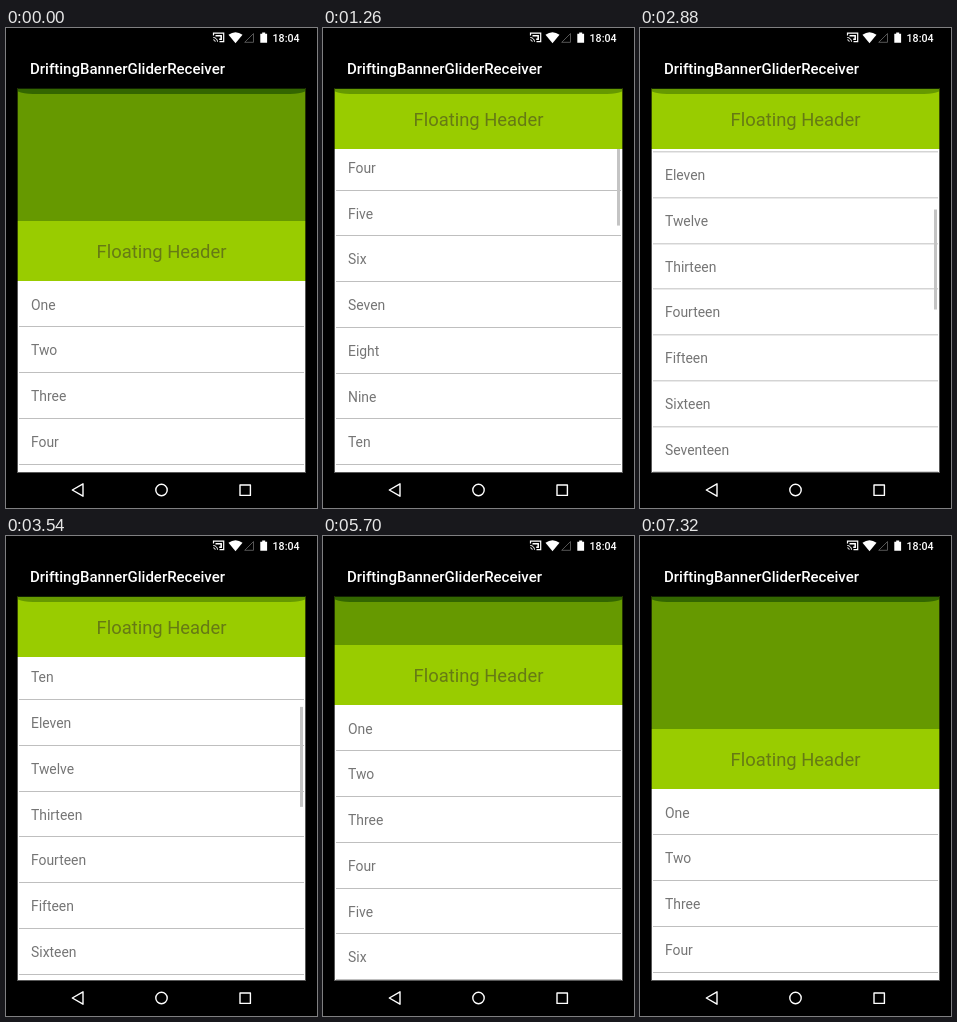
Write an HTML page that moves like this. It is 311 by 480 pixels and loops after 7500 ms.

```html
<!DOCTYPE html>
<html lang="en">
<head>
<meta charset="utf-8">
<title>Floating Header</title>
<style>
@property --scroll { syntax: "<length>"; inherits: true; initial-value: 0px; }

html, body { margin: 0; width: 100%; height: 100%; overflow: hidden; background: #000; }
body { font-family: Roboto, "Open Sans", sans-serif; }

.stage { position: absolute; left: 0; top: 0; width: 311px; height: 480px; overflow: hidden; background: #000; }
.chrome { position: absolute; left: 0; top: 0; }
.chrome text { fill: #fff; font-weight: 500; }

.screen {
  position: absolute; left: 11px; top: 60px; width: 289px; height: 385px;
  overflow: hidden; background: #fff;
  animation: scroll 7500ms infinite;
}
/* soft dark rim around the screen */
.screen::after { content: ""; position: absolute; inset: 0; box-shadow: inset 0 0 0 1px rgba(0, 0, 0, .65); }

.list {
  position: absolute; left: 0; top: 193.5px; width: 100%; margin: 0; padding: 0; list-style: none;
  transform: translateY(calc(-1 * var(--scroll)));
}
.list li {
  box-sizing: border-box; height: 45.75px; margin: 0 2px; padding-left: 12px;
  border-bottom: 1px solid #bfbfbf;
  font-size: 13.9px; line-height: 47.6px; color: #757575;
}
.thumb {
  position: absolute; right: 3px; top: -36px; width: 3px; height: 100px; background: #c4c4c4;
  transform: translateY(calc(var(--scroll) * .2685));
}
.header {
  position: absolute; left: 0; top: 0; width: 100%; height: 193px;
  background: linear-gradient(#690 133px, #9c0 133px);
  transform: translateY(calc(-1 * min(var(--scroll), 132px)));
}
.header span {
  position: absolute; left: 0; right: 0; top: 133px;
  text-align: center; font-size: 18.4px; line-height: 62px; color: #667a14;
}
.edge { position: absolute; left: 1px; top: 0; mix-blend-mode: difference; fill: #330; }
.glow { transform: scaleY(0); animation: glow 7500ms infinite; }

/* The screen refreshes every 60 ms, which is 0.8% of the loop. */
@keyframes scroll {
  0%    { --scroll: 0px;   animation-timing-function: steps(3); }
  2.4%  { --scroll: 0px;   animation-timing-function: steps(5); }
  6.4%  { --scroll: 55px;  animation-timing-function: steps(5); }
  10.4% { --scroll: 134px; animation-timing-function: steps(8); }
  16.8% { --scroll: 274px; animation-timing-function: steps(6); }
  21.6% { --scroll: 345px; animation-timing-function: steps(5); }
  25.6% { --scroll: 375px; animation-timing-function: steps(6); }
  30.4% { --scroll: 439px; animation-timing-function: steps(6); }
  35.2% { --scroll: 540px; animation-timing-function: steps(6); }
  40%   { --scroll: 610px; animation-timing-function: steps(4); }
  43.2% { --scroll: 600px; animation-timing-function: steps(5); }
  47.2% { --scroll: 547px; animation-timing-function: steps(7); }
  52.8% { --scroll: 390px; animation-timing-function: steps(8); }
  59.2% { --scroll: 243px; animation-timing-function: steps(5); }
  63.2% { --scroll: 205px; animation-timing-function: steps(5); }
  67.2% { --scroll: 165px; animation-timing-function: steps(11); }
  76%   { --scroll: 84px;  animation-timing-function: steps(5); }
  80%   { --scroll: 35px;  animation-timing-function: steps(5); }
  84%, 100% { --scroll: 0px; }
}
@keyframes glow {
  0%, 84% { transform: scaleY(0); animation-timing-function: steps(6); }
  88.8%   { transform: scaleY(1); animation-timing-function: steps(7); }
  94.4%   { transform: scaleY(.14); animation-timing-function: steps(4); }
  97.6%, 100% { transform: scaleY(0); }
}
</style>
</head>
<body>
<div class="stage">
  <div class="screen">
    <ul class="list">
      <li>One</li><li>Two</li><li>Three</li><li>Four</li><li>Five</li>
      <li>Six</li><li>Seven</li><li>Eight</li><li>Nine</li><li>Ten</li>
      <li>Eleven</li><li>Twelve</li><li>Thirteen</li><li>Fourteen</li><li>Fifteen</li>
      <li>Sixteen</li><li>Seventeen</li><li>Eighteen</li><li>Nineteen</li><li>Twenty</li>
    </ul>
    <div class="thumb"></div>
    <div class="header"><span>Floating Header</span></div>
    <svg class="edge" width="287" height="60">
      <path d="M0 0H287V3.5Q282 5.6 272 6H15Q5 5.6 0 3.5Z"/>
      <path class="glow" d="M0 0H287V2Q143.5 88 0 2Z"/>
    </svg>
  </div>

  <svg class="chrome" width="311" height="480">
    <text x="24" y="46" font-size="15">DriftingBannerGliderReceiver</text>
    <text x="266.6" y="13.7" font-size="10.6">18:04</text>

    <!-- cast, wifi, signal, battery -->
    <g fill="none" stroke="#fff">
      <path d="M207.5 7.5V5.2H217.7V13.7H213.5" stroke-width="1.2"/>
      <path d="M207.3 9.5A4.2 4.2 0 0 1 211.5 13.7M207.3 11.8A1.9 1.9 0 0 1 209.2 13.7"/>
      <path d="M209.5 7.7H215.2V11.2H213.2" stroke-width="1.5"/>
    </g>
    <path d="M222.5 6.8Q229.5 1.8 236.5 6.8L229.5 15.3Z" fill="#fff"/>
    <path d="M247.5 5.5V14.3H238.7Z" fill="none" stroke="#555"/>
    <path d="M254.3 5.7H256.2V4.4H259.2V5.7H261.1V14.8H254.3Z" fill="#fff"/>

    <!-- back, home, recents -->
    <g fill="none" stroke="#fff" stroke-width="1.4" stroke-linejoin="round">
      <path d="M66.3 462L77 455.8V468.2Z"/>
      <circle cx="155.5" cy="462" r="5.7"/>
      <rect x="234" y="457" width="10.4" height="10.4"/>
    </g>
  </svg>
</div>
</body>
</html>
```
